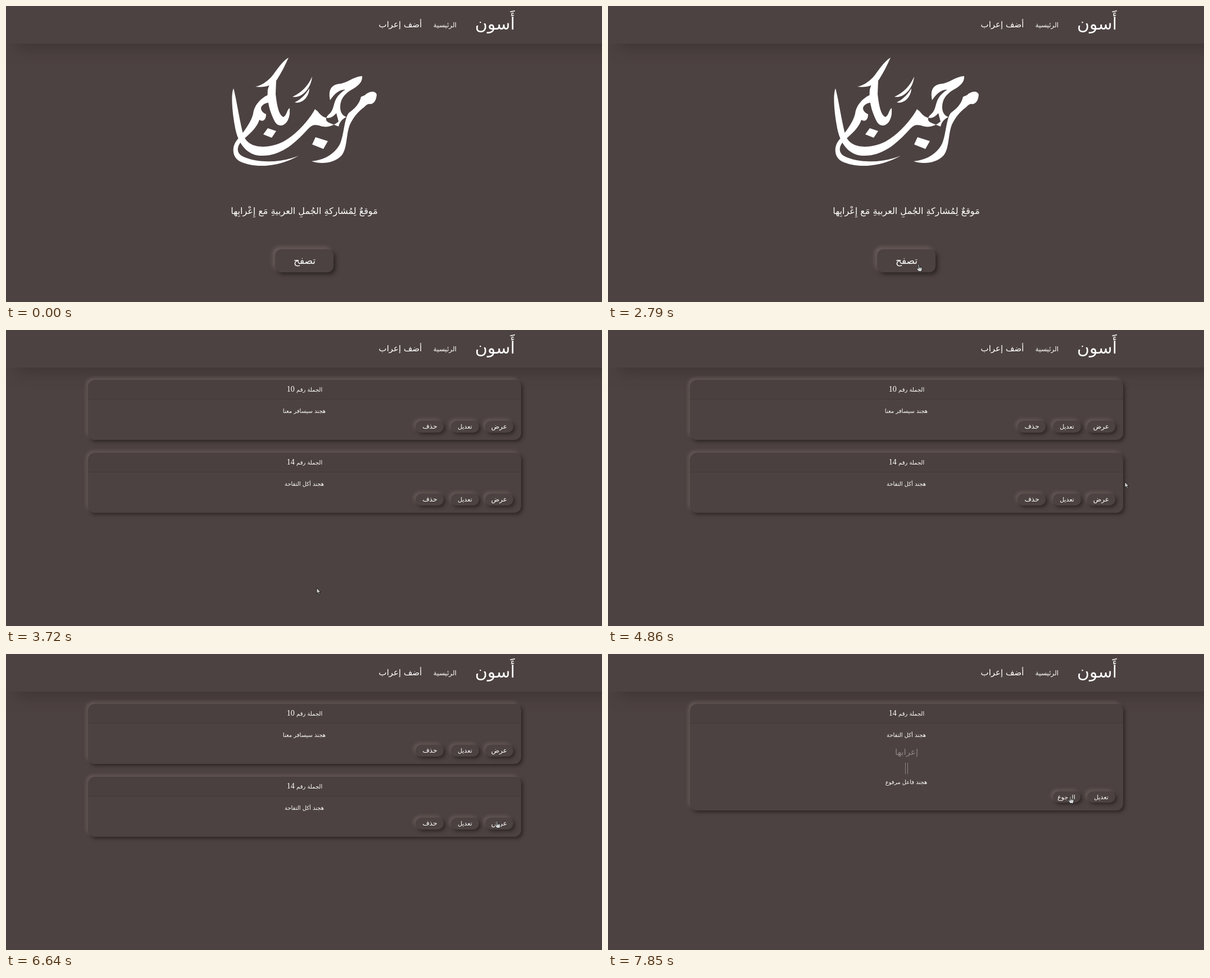
Recreate the animation shown at these times as an HTML page. Size 1061 by 528 pixels, loop 8000 ms.

```html
<!DOCTYPE html>
<html lang="ar">
<head>
<meta charset="utf-8">
<title>جمل وإعراب</title>
<style>
html, body { margin: 0; width: 100%; height: 100%; overflow: hidden; background: #4c4241; }
#stage { position: relative; width: 1061px; height: 528px; overflow: hidden; background: #4c4241; }
#stage > div, .box, svg { position: absolute; left: 0; top: 0; }
svg { width: 1061px; height: 528px; overflow: hidden; }
text { font-family: "DejaVu Sans", sans-serif; direction: rtl; text-anchor: middle; }
.digits { font: 14px "Liberation Serif", serif; }
#stage > .bar { width: 1061px; height: 67px; background: #4c4241; box-shadow: 20px 10px 25px #403736; }
.box { background: #4c4241; box-shadow: 3px 3px 6px #2c2524, -3px -3px 6px #6a5d5b; }
.card { border-radius: 12px; overflow: hidden; }
.card::before { content: ""; display: block; height: 34px; background: rgba(0,0,0,.03); border-bottom: 1px solid rgba(0,0,0,.125); }
.small { border-radius: 10px; }
.big { border-radius: 11px; box-shadow: 4px 4px 7px #2c2524, -4px -4px 7px #6c5f5d; }
</style>
</head>
<body>
<div id="stage"></div>
<script>
const LOOP = 8000;
const stage = document.getElementById("stage");

const box = (kind, x, y, w, h) =>
  `<div class="box ${kind}" style="left:${x}px;top:${y}px;width:${w}px;height:${h}px"></div>`;
const label = (x, y, size, text, fill = "#fff") =>
  `<text x="${x}" y="${y}" font-size="${size}" fill="${fill}">${text}</text>`;
const svg = content => `<svg>${content}</svg>`;
const title = (y, n) => label(531.5, y, 10, `الجملة رقم <tspan class="digits">${n}</tspan>`);

// Calligraphic greeting, one outline per stroke
const strokes = [
  "M405 147C400 158 403 190 407 212C411 240 425 265 452 267C490 269 516 243 538 219C545 211 552 211 560 214C572 218 584 213 592 206L588 191C578 204 565 202 555 188L550 184C540 203 510 240 478 248C452 255 428 250 422 228C415 200 410 165 405 147Z",
  "M577 168C573 150 579 141 592 139C607 138 618 126 634 125C635 136 627 143 614 150C601 158 595 168 595 180C595 189 598 195 606 198C598 202 594 207 592 215L577 209C568 206 568 200 574 194C584 186 582 176 588 165C592 158 598 153 604 149C592 149 584 158 577 168Z",
  "M660 158C657 150 646 152 639 159L632 162C629 176 619 184 610 191C602 202 602 228 595 245C586 264 566 275 544 277C562 283 585 280 597 267C608 254 605 230 612 212C618 199 627 188 637 181C641 177 644 174 649 175C655 174 659 169 660 158Z",
  "M551 234L573 241L565 255L545 247Z",
  "M466 218L481 223L473 235L458 229Z",
  "M545 126C538 142 527 154 510 162C527 165 543 147 545 126Z",
  "M540 147C534 157 526 166 514 172C529 175 540 160 540 147Z",
  "M503 92C490 100 482 115 472 127C463 136 454 142 444 144C460 146 474 142 482 132C490 119 497 106 503 92Z",
  "M471 134L466 149C464 170 470 190 479 207C485 216 495 215 501 205C506 196 505 189 505 182C500 185 500 195 494 198C485 195 482 174 480 157L481 132Z",
  "M468 158C455 163 442 176 440 192C437 205 427 220 413 237C401 250 402 269 416 277C445 291 488 286 521 267C490 280 447 281 421 268C407 260 412 246 426 235C440 223 448 213 451 203C457 207 463 204 463 193C456 190 452 184 455 179C459 174 465 172 470 172Z"
];

const buttons = [
  [[479, 434, 104, 41]],
  [162, 292].flatMap(y => [853, 792, 729].map(x => [x, y, 50, 21])),
  [[853, 245, 50, 20], [792, 245, 49, 20]]
];
const buttonBoxes = page =>
  buttons[page].map(r => box(page ? "small" : "big", ...r)).join("");
const actions = y => label(878, y, 12, "عرض") + label(817, y, 11, "تعديل") + label(754.5, y, 12, "حذف");
const sentence = (y, text) => label(531, y, 10, text);

const pageMarkup = [
  buttonBoxes(0) + svg(
    `<path fill="#fff" d="${strokes.join("")}"/>` +
    label(531, 371, 16, "مَوقعٌ لِمُشاركةِ الجُملِ العربيةِ مَع إِعْرابِها") +
    label(531.5, 460, 17, "تصفح")),
  box("card", 146, 89, 771, 107) + box("card", 146, 219, 771, 107) + buttonBoxes(1) + svg(
    title(110, 10) + sentence(148, "هجند سيسافر معنا") + actions(176) +
    title(240, 14) + sentence(278, "هجند أكل التفاحة") + actions(306)),
  box("card", 146, 89, 771, 190) + buttonBoxes(2) + svg(
    title(110, 14) + sentence(148, "هجند أكل التفاحة") +
    label(531.5, 180, 15, "إعرابها", "#8c8584") +
    `<path d="M529.5 194v20M533.5 194v20" stroke="#8c8584"/>` +
    sentence(232, "هجند فاعل مرفوع") +
    label(878, 259, 11, "تعديل") + label(816, 259, 11, "الرجوع"))
];

stage.innerHTML =
  `<div class="bar"></div>` +
  svg(label(870.5, 42, 30, "أَسون") + label(781.5, 38, 12, "الرئيسية") + label(702, 38, 15, "أضف إعراب")) +
  pageMarkup.map(m => `<div class="page">${m}</div>`).join("") +
  svg(`<g id="pointer">
    <path id="arrow" d="M0 0V10L2.4 8L4 11.5L5.7 10.8L4.2 7.5H7.2Z" fill="#ccc" stroke="#151212" stroke-width=".9"/>
    <path id="hand" d="M-1 1Q0-.5 1 1V5L5.3 6Q6.7 6.5 6.4 8L5.5 12V13.5H-.2L-3.5 9Q-4.3 7.5-2.7 7.4L-1 9ZM1 5V8M3 6V8M5 6.5V8" fill="#d4d6d6" stroke="#151212" stroke-width=".9"/>
    <circle id="halo" r="8.5" fill="#ff0" fill-opacity=".47"/>
  </g>`);

const pages = [...document.querySelectorAll(".page")];
const [pointer, arrow, hand, halo] =
  ["pointer", "arrow", "hand", "halo"].map(id => document.getElementById(id));

// start, end, steps, then the points of a cubic curve
const moves = [
  [360, 1130, 12, [897, 522], [800, 500], [650, 465], [558, 462]],
  [1200, 1200, 1, [555, 461]],
  [1270, 1270, 1, [553, 460]],
  [3720, 3720, 1, [553, 460]],
  [4250, 5000, 12, [553, 460], [780, 420], [965, 355], [912, 250]],
  [5070, 5840, 12, [912, 250], [900, 215], [866, 250], [874, 293]],
  [5910, 5910, 1, [874, 295]],
  [6040, 6040, 1, [874, 297]],
  [7170, 7590, 7, [874, 297], [860, 284], [841, 265], [825, 250]],
  [7850, 7850, 1, [823, 253]]
];
const clicks = [[2590, 2790], [6510, 6640]];

const pageAt = t => t < 2930 ? 0 : t < 6850 ? 1 : 2;
const show = (el, on) => { el.style.display = on ? "" : "none"; };

function curve(points, u) {
  if (points.length === 1) return points[0];
  const v = 1 - u, weights = [v ** 3, 3 * v * v * u, 3 * v * u * u, u ** 3];
  return [0, 1].map(axis => weights.reduce((sum, w, i) => sum + w * points[i][axis], 0));
}

function position([start, end, steps, ...points], t) {
  const gap = (end - start) / (steps - 1);
  const step = steps > 1 ? Math.min(steps - 1, Math.floor((t - start) / gap + .1)) : 0;
  const eased = (1 - Math.cos(Math.PI * (step + 1) / steps)) / 2;
  return curve(points, eased).map(Math.round);
}

function draw(t) {
  const page = pageAt(t);
  pages.forEach((el, i) => show(el, i === page));
  const move = moves.filter(m => m[0] <= t).pop();
  show(pointer, move);
  if (!move) return;
  const [x, y] = position(move, t);
  // The pointer shape is refreshed only when the mouse moves
  const over = buttons[pageAt(move[0])].some(([bx, by, w, h]) =>
    x >= bx && x <= bx + w && y >= by && y <= by + h);
  pointer.setAttribute("transform", `translate(${x} ${y})`);
  show(arrow, !over);
  show(hand, over);
  show(halo, clicks.some(([a, b]) => t >= a && t < b));
}

const origin = performance.now();
function tick() {
  draw((performance.now() - origin) % LOOP);
  requestAnimationFrame(tick);
}
tick();
</script>
</body>
</html>
```
